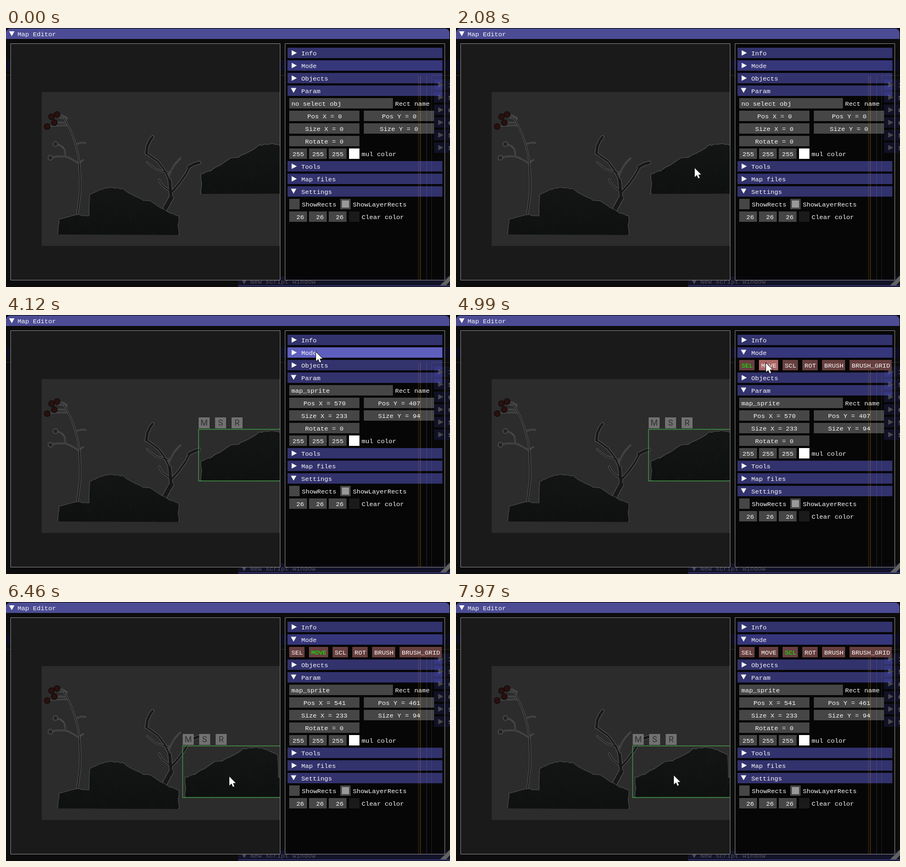
An HTML page with a canvas for the animation above (8 s loop, 809 px wide and 473 px high).

```html
<!DOCTYPE html>
<html>
<head>
<meta charset="utf-8">
<title>Map Editor</title>
<style>
html, body { margin: 0; width: 100%; height: 100%; overflow: hidden; background: #0c0c0c; }
canvas { display: block; }
</style>
</head>
<body>
<canvas id="stage" width="809" height="473"></canvas>
<script>
const ctx = document.getElementById('stage').getContext('2d');
const LOOP = 8000, HOVER_LAG = 40, ROW = 23, BOX = 19;
const MONO = '11.667px "Liberation Mono", monospace';
const TEXT = '#f8f8f8', FRAME = 'rgba(212,212,212,.31)', FRAME_HOT = 'rgba(230,204,204,.4)';
const HEADER = 'rgba(102,102,230,.46)', HEADER_HOT = 'rgba(115,115,230,.8)';
const SELECT = 3150, OPEN_MODE = 4350, PICK_MOVE = 5280, DRAG = 5780, DROP = 6490, PICK_SCALE = 7440;

// Pointer moves: start, end, x, y
const MOVES = [
  [790, 1080, 574, 202], [1080, 1230, 572, 184],
  [1440, 1680, 530, 152], [1680, 2080, 435, 256], [2560, 2860, 441, 258],
  [3450, 3660, 538, 103], [3660, 4120, 565, 68], [4630, 4990, 565, 88],
  [5280, DRAG, 436, 265], [DRAG, 5970, 432, 281], [5970, 6450, 407, 319],
  [6530, 6910, 600, 131], [6940, 7130, 600, 101], [7130, 7300, 608, 89],
  [PICK_SCALE, 7970, 397, 317]
];

// Straight moves; those that end in a pause slow down
function pointer(t) {
  let x = 585, y = 448;
  if (t < MOVES[0][0]) return [-99, -99];
  MOVES.forEach(([start, end, toX, toY], i) => {
    if (t < start) return;
    const u = Math.min(1, (t - start) / (end - start));
    const flowsOn = MOVES[i + 1]?.[0] === end;
    const k = flowsOn ? u : 1 - (1 - u) ** 2;
    x += (toX - x) * k;
    y += (toY - y) * k;
  });
  return [Math.round(x), Math.round(y)];
}

function rect(x, y, w, h, color) {
  ctx.fillStyle = color;
  ctx.fillRect(x, y, w, h);
}

function text(str, x, y, color = TEXT) {
  ctx.font = MONO;
  ctx.fillStyle = color;
  ctx.fillText(str, x, y);
}

function trace(points) {
  ctx.beginPath();
  points.forEach(p => ctx.lineTo(...p));
}

function fillShape(points, color) {
  trace(points);
  ctx.fillStyle = color;
  ctx.fill();
}

function stroke(color, width = 1) {
  ctx.strokeStyle = color;
  ctx.lineWidth = width;
  ctx.stroke();
}

function arrow(x, y, open, color = TEXT) {
  fillShape(open ? [[x - 5, y - 5], [x + 5, y - 5], [x, y + 4]]
                 : [[x - 3.5, y - 5], [x + 6, y], [x - 3.5, y + 5]], color);
}

function random(seed) {
  return () => (seed = seed * 16807 % 2147483647) / 2147483647;
}

// Rough ridge from a few corners, measured from the bottom left
function ridge() {
  const corners = [[0, 0], [2, -30], [32, -37], [57, -35], [58, -74], [82, -84], [98, -87],
                   [118, -84], [150, -65], [168, -62], [203, -40], [219, -35], [220, 0]];
  const rnd = random(77);
  return corners.flatMap(([x, y], i) => {
    const [nx, ny] = corners[i + 1] || [x, y];
    return [0, .25, .5, .75].map(k => [
      x + (nx - x) * k + rnd() * 2 - 1,
      Math.min(0, y + (ny - y) * k + rnd() * 2.4 - 1.2)]);
  });
}
const RIDGE = ridge();

function rock(x, y, sx, sy) {
  const rnd = random(31);
  ctx.save();
  ctx.translate(x, y);
  ctx.scale(sx, sy);
  const shade = ctx.createLinearGradient(0, -88, 0, 0);
  shade.addColorStop(0, '#141515');
  shade.addColorStop(1, '#0e1110');
  fillShape(RIDGE, shade);
  stroke('#4e4f4e');
  ctx.clip();
  for (let i = 0; i < 60; i++) {
    const px = rnd() * 220, py = -rnd() * 88, len = 4 + rnd() * 10;
    trace([[px, py], [px + len * .5, py + len * .4], [px + len * .6, py + len]]);
    stroke(i % 2 ? 'rgba(0,0,0,.2)' : 'rgba(120,130,125,.05)');
  }
  ctx.restore();
}

const UPPER_BERRIES = [[93, 158], [83, 162], [88, 173], [75, 180]];
const LOWER_BERRIES = [[90, 212], [81, 237]];

// Twigs: width, start, end, sideways bend
const TWIGS = [
  ...UPPER_BERRIES.map(([x, y]) => [.8, x, y, 111, 164 + (y - 158) * .65, 1]),
  [.8, 90, 212, 108, 234, 7], [.8, 81, 237, 132, 247, 7],
  [.8, 126, 213, 145, 210, 2], [.8, 133, 249, 141, 241, 1],
  [2.2, 130, 340, 134, 250, -3], [1.4, 134, 250, 106, 164, -5],
  [8, 286, 337, 301, 310, 0], [5.5, 301, 312, 298, 278, 0],
  [3, 299, 282, 256, 229, -7], [4.5, 256, 229, 267, 199, 3],
  [3.5, 301, 300, 334, 254, -3], [5, 333, 254, 352, 246, 1],
  [1, 297, 270, 318, 238, 3], [1.6, 296, 264, 257, 245, 4], [2, 299, 297, 279, 277, 3]
];

function twigCurve(x0, y0, x1, y1, bend, rnd) {
  const dx = x1 - x0, dy = y1 - y0, len = Math.hypot(dx, dy);
  return Array.from({ length: 9 }, (_, i) => {
    const u = i / 8, off = (bend + rnd() - .5) * Math.sin(Math.PI * u);
    return [x0 + dx * u + dy / len * off, y0 + dy * u - dx / len * off];
  });
}

function berry(x, y, r, fill, edge) {
  ctx.beginPath();
  ctx.arc(x, y, r, 0, 7);
  ctx.fillStyle = fill;
  ctx.fill();
  stroke(edge, 1.3);
}

function plants() {
  ctx.save();
  ctx.lineJoin = ctx.lineCap = 'round';
  for (const [extra, color] of [[1.7, '#5e5e5e'], [0, '#171818']]) {
    const rnd = random(9);
    for (const [width, ...curve] of TWIGS) {
      trace(twigCurve(...curve, rnd));
      stroke(color, width + extra);
    }
  }
  ctx.restore();
  UPPER_BERRIES.forEach(p => berry(...p, 5.3, '#2a100f', '#120b0b'));
  LOWER_BERRIES.forEach(p => berry(...p, 4.3, '#232323', '#565656'));
}

function backdrop() {
  rect(0, 0, 809, 473, '#0c0c0c');
  rect(0, 59, 809, 19, '#0c0c20');
  rect(0, 86, 767, 1, '#262626');
  rect(423, 454, 386, 16, '#131329');
  rect(423, 470, 386, 2, '#32326c');
  arrow(434, 464, true, '#4a4a50');
  text('New script window', 445, 467, '#515158');
}

function border(x, y, w, h) {
  ctx.beginPath();
  ctx.rect(x + .5, y + .5, w, h);
  stroke('#808080');
}

function selection(dx, dy) {
  ctx.beginPath();
  ctx.rect(350.8 + dx, 208.8 + dy, 233, 94.2);
  stroke('#418a44', 1.4);
  ctx.textAlign = 'center';
  [...'MSR'].forEach((label, i) => {
    const x = 351 + dx + 30 * i;
    rect(x, 187 + dy, 20, 20, '#717171');
    ctx.font = '15px Roboto, sans-serif';
    ctx.fillStyle = '#303030';
    ctx.fillText(label, x + 10, 202 + dy);
  });
  ctx.textAlign = 'left';
}

function scene(t, dx, dy) {
  rect(8, 28, 492, 433, '#1a1a1a');
  ctx.save();
  ctx.beginPath();
  ctx.rect(8, 28, 492, 433);
  ctx.clip();
  rect(65, 117, 435, 281, '#2c2c2c');
  plants();
  rock(95, 378, 1, 1);
  rock(584 + dx, 303 + dy, -1.04, 1.055);
  if (t >= SELECT) selection(dx, dy);
  ctx.restore();
  border(8, 28, 491, 432);
}

function behindPanel() {
  rect(508, 28, 292, 433, 'rgba(4,4,4,.78)');
  rect(508, 59, 292, BOX, '#0c0c20');
  rect(751, 87, 1, 373, '#402b08');
  rect(754, 87, 2, 373, '#362608');
  rect(766, 87, 1, 373, '#242424');
  rect(775, 87, 1, 373, '#1d1d1d');
  rect(775, 86, 34, 1, '#242424');
  [...'ISOCSS'].forEach((letter, i) => {
    const y = 94 + ROW * i;
    rect(780, y, 29, BOX, '#111126');
    arrow(791, y + 9.5, false, '#48484c');
    text(letter, 806, y + 14, '#8a8a8a');
  });
}

function panel(t, dx, dy, mx, my) {
  const modeOpen = t >= OPEN_MODE, selected = t >= SELECT;
  let y = 36;
  const over = (x, w) => mx >= x && mx < x + w && my >= y && my < y + BOX;
  const label = (str, x, color) => text(str, x, y + 14, color);
  const nextRow = () => { y += ROW; };

  function header(name, open) {
    rect(513, y, 282, BOX, over(513, 282) ? HEADER_HOT : HEADER);
    arrow(524, y + 9.5, open);
    label(name, 538);
    nextRow();
  }
  function field(x, w, value) {
    rect(x, y, w, BOX, over(x, w) ? FRAME_HOT : FRAME);
    label(value, Math.round(x + w / 2 - value.length * 3.5));
  }
  function pair(name, a, b) {
    field(516, 128, `${name} X = ${selected ? a : 0}`);
    field(652, 128, `${name} Y = ${selected ? b : 0}`);
    nextRow();
  }
  function colorRow(value, swatch, name) {
    [516, 552, 588].forEach(x => field(x, 32.5, String(value).padStart(3)));
    rect(625, y, BOX, BOX, swatch);
    label(name, 648);
    nextRow();
  }
  function checkbox(x, name, checked) {
    rect(x, y, BOX, BOX, FRAME);
    if (checked) rect(x + 3, y + 3, 13, 13, '#999');
    label(name, x + 23);
  }
  function modes() {
    const active = t >= PICK_SCALE ? 'SCL' : t >= PICK_MOVE ? 'MOVE' : 'SEL';
    let x = 516;
    for (const name of ['SEL', 'MOVE', 'SCL', 'ROT', 'BRUSH', 'BRUSH_GRID']) {
      const w = name.length * 7 + 7;
      rect(x, y, w, BOX, over(x, w) ? '#ab6666' : '#673f3f');
      label(name, x + 4, name === active ? '#0f0' : TEXT);
      x += w + 8;
    }
    nextRow();
  }

  behindPanel();
  header('Info');
  header('Mode', modeOpen);
  if (modeOpen) modes();
  header('Objects');
  header('Param', true);
  rect(516, y, 189, BOX, FRAME);
  label(selected ? 'map_sprite' : 'no select obj', 520);
  label('Rect name', 709);
  nextRow();
  pair('Pos', 570 + dx, 407 + dy);
  pair('Size', 233, 94);
  field(516, 128, 'Rotate = 0');
  nextRow();
  colorRow(255, '#fff', 'mul color');
  header('Tools');
  header('Map files');
  header('Settings', true);
  checkbox(516, 'ShowRects', false);
  checkbox(609, 'ShowLayerRects', true);
  nextRow();
  colorRow(26, '#1a1a1a', 'Clear color');
  border(508, 28, 291, 432);
}

function chrome() {
  ctx.beginPath();
  ctx.roundRect(0, 1, 808, 19, [8, 8, 0, 0]);
  ctx.fillStyle = '#4c4c95';
  ctx.fill();
  arrow(10.5, 11, true);
  text('Map Editor', 21, 15);
  fillShape([[809, 452], [809, 462], [802, 470], [791, 470]], '#626262');
}

function cursor(x, y) {
  ctx.save();
  ctx.translate(x, y);
  fillShape([[0, 0], [0, 16], [4, 12.5], [6.5, 18.5], [9, 17.5], [6.5, 11.8], [11.5, 11.5]], '#fff');
  ctx.closePath();
  stroke('#181818', 1.6);
  ctx.fill();
  ctx.restore();
}

function draw(now) {
  const t = now % LOOP;
  const [x, y] = pointer(Math.min(t, DROP));
  const dx = t < DRAG ? 0 : x - 436, dy = t < DRAG ? 0 : y - 265;
  backdrop();
  scene(t, dx, dy);
  panel(t, dx, dy, ...pointer(t - HOVER_LAG));
  chrome();
  cursor(...pointer(t));
  requestAnimationFrame(draw);
}
requestAnimationFrame(draw);
</script>
</body>
</html>
```
